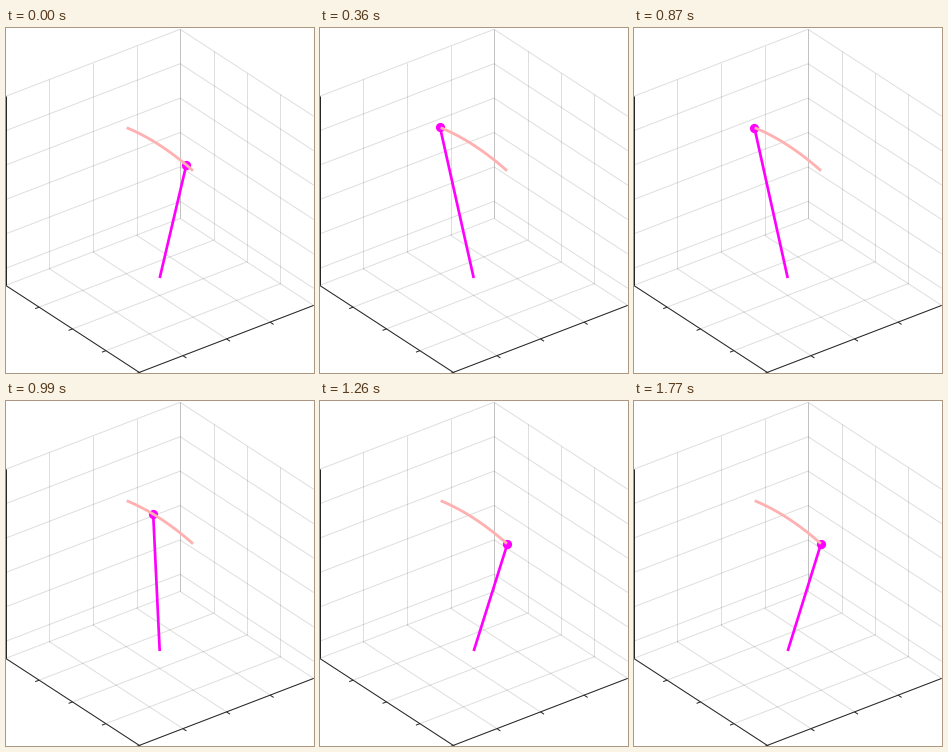
Animation, 308 px wide and 345 px high, one loop 1.8 s. Source, as a matplotlib script:

```python
import numpy as np
import matplotlib.pyplot as plt
from matplotlib.animation import FuncAnimation

W, H, DPI = 308, 345, 64
PX = 72 / DPI
FRAMES, STEP = 60, 30
HALF, SWING = 30, 10
REST, PEAK = 33.3, 33.7
GRID, EDGE = (0.15, 0.15, 0.15, 0.15), "#262626"
ROD, TRAIL = "#ff00ff", "#ffb0b0"

fig = plt.figure(figsize=(W / DPI, H / DPI), dpi=DPI, facecolor="white")
ax = fig.add_axes([0, 0, 1, 1])
ax.set_xlim(0, W)
ax.set_ylim(H, 0)
ax.axis("off")

# Orthographic box: back floor corner and its three edge vectors
back = np.array([174.1, 190.4])
left = np.array([-174.4, 67.0])
right = np.array([133.6, 87.0])
up = np.array([0.0, -189.2])


def line(a, b, color=GRID, width=1.0, z=1):
    return ax.plot([a[0], b[0]], [a[1], b[1]], color=color, lw=width * PX,
                   solid_capstyle="butt", zorder=z)[0]


# The back vertical belongs to both walls, so it comes out darker
for u in np.linspace(0, 1, 5):
    for side, other in ((left, right), (right, left)):
        p = back + u * side
        line(p, p + up)
        line(p, p + other)
for y in 1.3 + 34.4 * np.arange(6):
    p = np.array([back[0], y])
    line(p, p + left)
    line(p, p + right)

front = back + left + right
line(back + left + up, back + left, EDGE, z=2)
line(back + left, front, EDGE, z=2)
line(front, back + right, EDGE, z=2)


def tick(p, d):
    line(p, p + 4.2 * d / np.hypot(*d), EDGE, z=2)


for u in (0.25, 0.5, 0.75, 1):
    tick(back + left + u * right, left)
    tick(back + right + u * left, right)

pivot = np.array([153.7, 250.0])


def arc(d):
    return pivot[0] + d, 117.2 + 0.648 * d + 0.0036 * d * d


rod = line(pivot, pivot, ROD, 2.7, z=3)
ball, = ax.plot([], [], "o", color=ROD, ms=9.2 * PX, mew=0, zorder=4)
ax.plot(*arc(np.linspace(-33, 33.3, 40)), color=TRAIL, lw=2.8 * PX,
        solid_capstyle="butt", zorder=5)


def offset(i):
    """Fast constant sweep with a slight overshoot, then a slow drift back."""
    half, k = divmod((i + 1) % FRAMES, HALF)
    d = np.interp(k, [0, SWING, HALF], [-REST, PEAK, REST])
    return d if half else -d


def update(i):
    x, y = arc(offset(i))
    rod.set_data([pivot[0], x], [pivot[1], y])
    ball.set_data([x], [y])
    return rod, ball


anim = FuncAnimation(fig, update, frames=FRAMES, interval=STEP, repeat=True,
                     repeat_delay=0)
plt.show()
```
